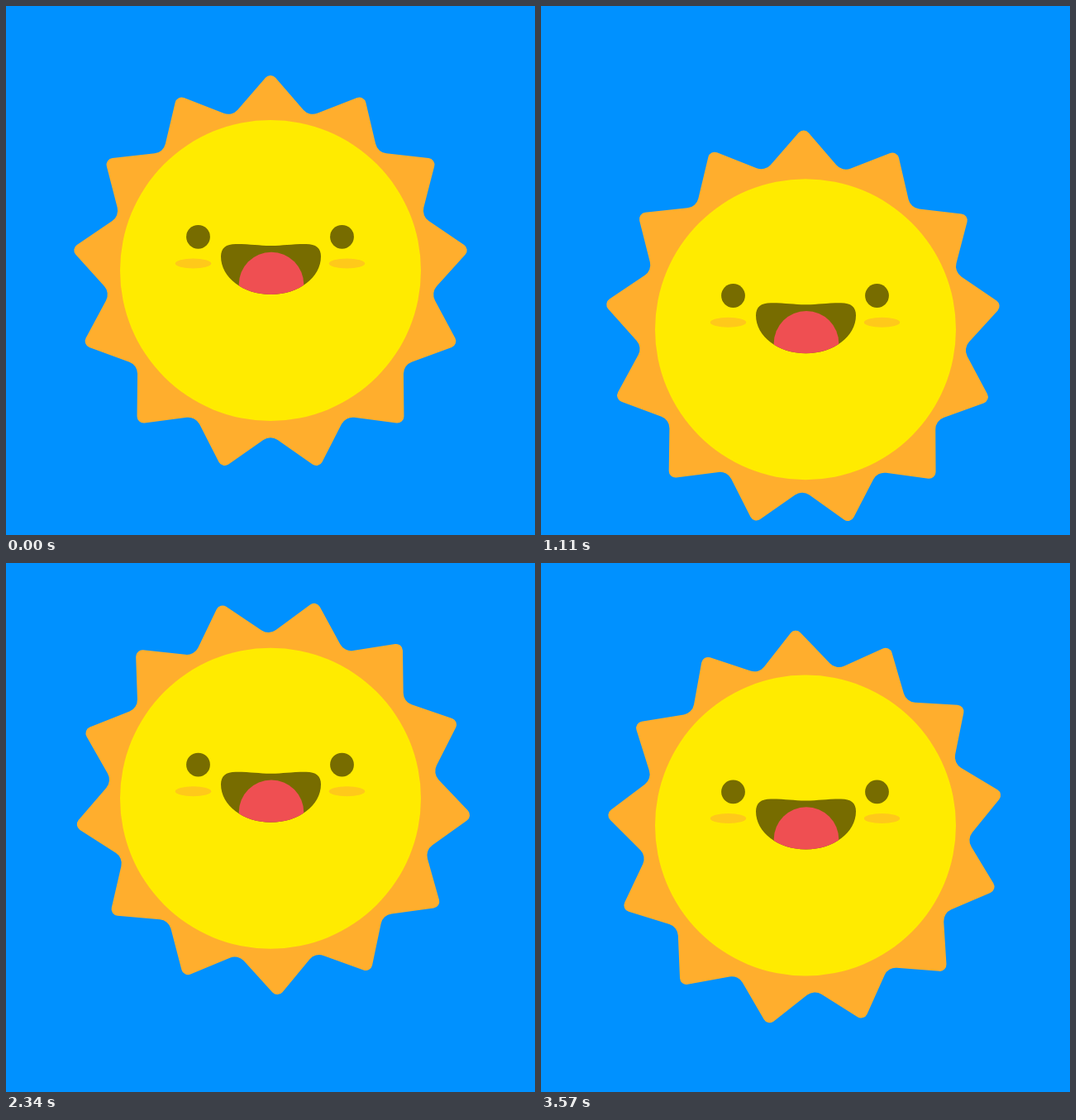
Recreate the animation shown at these times as an HTML page with a canvas. Size 640 by 640 pixels, loop 3600 ms.

```html
<!DOCTYPE html>
<html lang="en">
<head>
<meta charset="utf-8">
<title>Happy sun</title>
<style>
  html, body { margin: 0; width: 100%; height: 100%; overflow: hidden; background: #0091ff; }
  canvas { display: block; width: 640px; height: 640px; }
</style>
</head>
<body>
<canvas id="stage" width="640" height="640"></canvas>
<script>
const ctx = document.getElementById('stage').getContext('2d');
const LOOP = 3600, STEP = 30, TAU = Math.PI * 2;
const COLORS = {
  sky: '#0091ff', rays: '#ffae2d', face: '#ffeb00',
  dark: '#776c00', cheek: '#ffc91a', tongue: '#ef4f52'
};
// Vertical drift as [time, offset] pairs.
const DRIFT = [[0, 0], [630, 41], [1170, 75], [1200, 75], [2720, -72], [3600, 0]];

function driftAt(time) {
  const next = DRIFT.findIndex(([t]) => t > time);
  const [t0, y0] = DRIFT[next - 1], [t1, y1] = DRIFT[next];
  return y0 + (y1 - y0) * (time - t0) / (t1 - t0);
}

function makeRays() {
  const count = 13, outer = 243.6, inner = 195.4, centerY = 3.4;
  const corner = i => {
    const angle = i * Math.PI / count, radius = i % 2 ? inner : outer;
    return [radius * Math.sin(angle), centerY - radius * Math.cos(angle)];
  };
  const path = new Path2D();
  const [ax, ay] = corner(0), [bx, by] = corner(1);
  path.moveTo((ax + bx) / 2, (ay + by) / 2);
  for (let i = 1; i <= count * 2; i++) {
    path.arcTo(...corner(i), ...corner(i + 1), i % 2 ? 15 : 8);
  }
  path.closePath();
  return path;
}

const rays = makeRays();
const mouth = new Path2D(
  'M-60-17 C-60-27-54-32-42-32 C-22-32-15-30 .5-30 C16-30 23-32 43-32 ' +
  'C55-32 61-27 61-17 C61 8.5 34 29 .5 29 C-33 29-60 8.5-60-17Z');

function ellipse(x, y, rx, ry, color) {
  ctx.fillStyle = color;
  ctx.beginPath();
  ctx.ellipse(x, y, rx, ry, 0, 0, TAU);
  ctx.fill();
}

function drawFace() {
  ellipse(0, 0, 182, 182, COLORS.face);
  for (const side of [-1, 1]) {
    ellipse(side * 87 - 0.5, -40.7, 14.4, 14.4, COLORS.dark);
    ellipse(side * 93 - 0.5, -8.5, 21.7, 6, COLORS.cheek);
  }
  ctx.fillStyle = COLORS.dark;
  ctx.fill(mouth);
  ctx.save();
  ctx.clip(mouth);
  ellipse(1, 17, 39.3, 39.3, COLORS.tongue);
  ctx.restore();
}

function draw(now) {
  const time = Math.floor((now % LOOP) / STEP + 1e-6) * STEP % LOOP;
  ctx.fillStyle = COLORS.sky;
  ctx.fillRect(0, 0, 640, 640);
  ctx.save();
  ctx.translate(320, 320 + driftAt(time));
  ctx.save();
  ctx.rotate(TAU * time / LOOP);
  ctx.fillStyle = COLORS.rays;
  ctx.fill(rays);
  ctx.restore();
  drawFace();
  ctx.restore();
}

let start;
function tick(now) {
  start ??= now;
  draw(now - start);
  requestAnimationFrame(tick);
}
draw(0);
requestAnimationFrame(tick);
</script>
</body>
</html>
```
